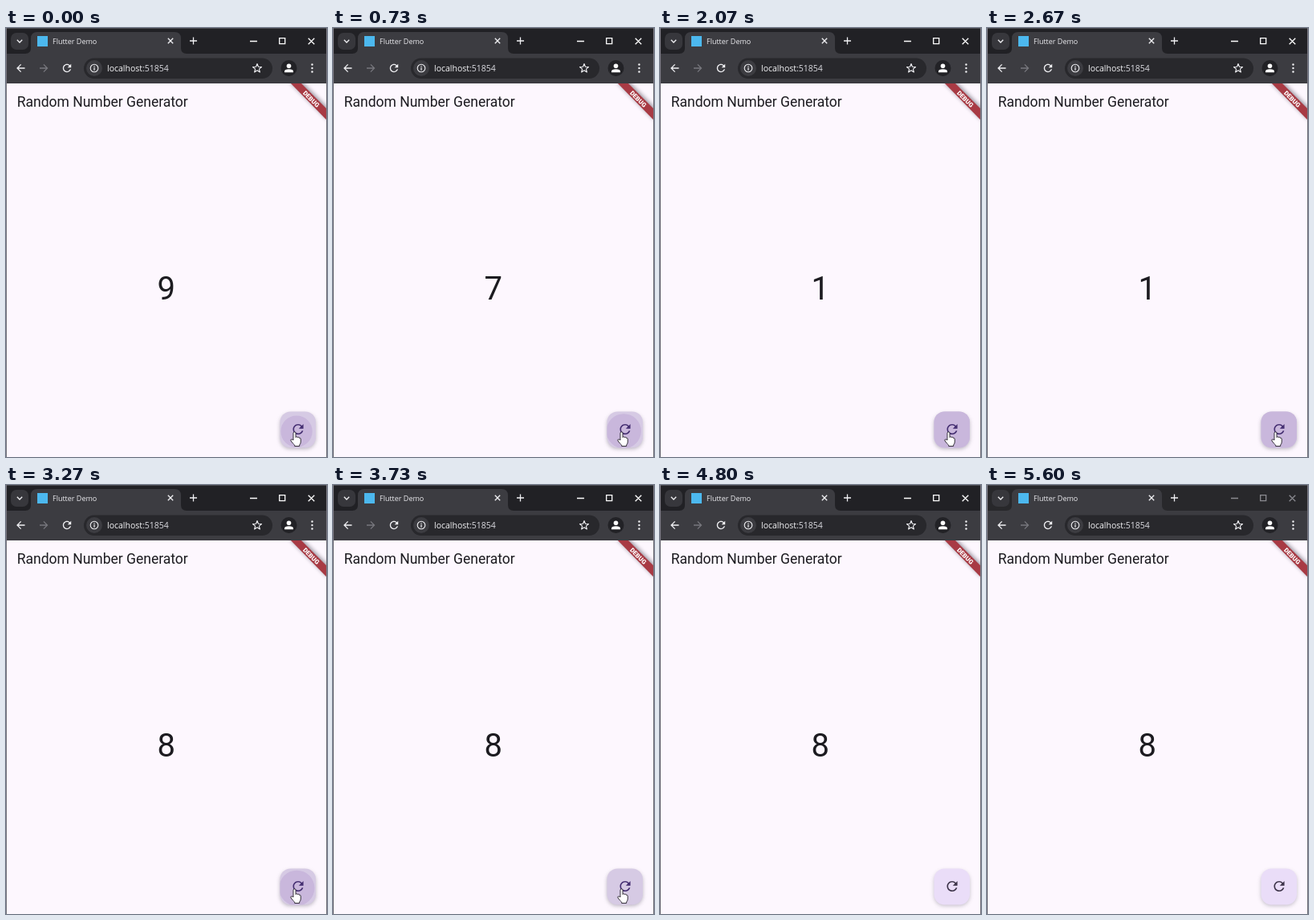
These frames come from a looping animation (400x534 px, 5670 ms). An HTML page:

```html
<!DOCTYPE html>
<html lang="en">
<head>
<meta charset="utf-8">
<title>Random Number Generator</title>
<style>
  html, body { margin: 0; width: 100%; height: 100%; overflow: hidden; background: #fdf7fe; }
  svg { display: block; width: 400px; height: 534px; }
  .ui { font-family: "Open Sans", "Noto Sans", sans-serif; }
  .app { font-family: Roboto, Arial, sans-serif; fill: #1c1b20; }
  .line { fill: none; stroke: #f1f1f4; stroke-width: 1.3; }
</style>
</head>
<body>
<svg viewBox="0 0 400 534">
  <defs>
    <path id="refresh" d="M17.65 6.35C16.2 4.9 14.21 4 12 4c-4.42 0-7.99 3.58-7.99 8s3.57 8 7.99 8c3.73 0 6.84-2.55 7.73-6h-2.08c-.82 2.33-3.04 4-5.65 4-3.31 0-6-2.69-6-6s2.69-6 6-6c1.66 0 3.14.69 4.22 1.78L13 11h7V4z"/>
    <clipPath id="page"><rect x="1" y="69" width="398" height="465"/></clipPath>
    <clipPath id="fabClip"><rect x="341.5" y="477.5" width="44.5" height="45" rx="13"/></clipPath>
    <filter id="blur" x="-40%" y="-40%" width="180%" height="180%"><feGaussianBlur stdDeviation="2.6"/></filter>
  </defs>

  <!-- window frame, tab and toolbar -->
  <rect width="400" height="534" fill="#fdf7fe"/>
  <rect id="titlebar" width="400" height="33"/>
  <rect y="32" width="400" height="37" fill="#3c3c41"/>
  <path d="M24 32q7 0 7-7V13q0-8 8-8h171q8 0 8 8v12q0 7 7 7z" fill="#3c3c41"/>
  <rect x="6" y="6" width="22" height="21" rx="7" fill="#37373c"/>
  <path class="line" d="M13.8 14.8l3.2 3.2 3.2-3.2"/>
  <rect x="39" y="10" width="13" height="13" fill="#4cb8ee"/>
  <text class="ui" x="58" y="20" font-size="9" fill="#ececf0">Flutter Demo</text>
  <path class="line" d="M201.8 12.8l6.4 6.4m0-6.4l-6.4 6.4M229 16h9m-4.5-4.5v9"/>
  <path id="controls" class="line" d="M304 16.5h9M340.7 12.7h7v7h-7zM376.7 12.7l7.6 7.6m0-7.6l-7.6 7.6"/>

  <path class="line" d="M23.5 50h-9.5m4.6-4.6L14 50l4.6 4.6"/>
  <path class="line" d="M42 50h9.5m-4.6-4.6l4.6 4.6-4.6 4.6" style="stroke:#77777d"/>
  <use href="#refresh" transform="translate(68.2 42.2) scale(.65)" fill="#f1f1f4"/>
  <rect x="97" y="37.5" width="235" height="25.5" rx="12.7" fill="#28282c"/>
  <circle cx="110" cy="50" r="10" fill="#3c3c41"/>
  <circle class="line" cx="110" cy="50" r="4.8" style="stroke-width:1.1"/>
  <path class="line" d="M110 49.3v3.4m0-5.5v1.2" style="stroke-width:1.2"/>
  <text class="ui" x="126" y="54" font-size="10.5" fill="#f6f6f8">localhost<tspan fill="#dcdce2">:51854</tspan></text>
  <path class="line" id="star" style="stroke-width:1.1;stroke-linejoin:round"/>
  <circle cx="352.5" cy="50" r="10" fill="#222226"/>
  <circle cx="352.5" cy="47.2" r="2.8" fill="#fff"/>
  <path d="M347 55.2v-1.4q0-2.6 5.5-2.6t5.5 2.6v1.4z" fill="#fff"/>
  <g fill="#f1f1f4"><circle cx="381.5" cy="45.5" r="1.2"/><circle cx="381.5" cy="50" r="1.2"/><circle cx="381.5" cy="54.5" r="1.2"/></g>
  <path d="M0 .5h400" stroke="#4a4a50"/>
  <path d="M.5 0v534M399.5 0v534" stroke="#77757e"/>

  <!-- page -->
  <text class="app" x="13.7" y="97.8" font-size="17.5">Random Number Generator</text>
  <text class="app" id="number" x="199.8" y="338.3" font-size="40" text-anchor="middle">9</text>
  <g clip-path="url(#page)">
    <path d="M353 67l48 48v-16l-32-32z" fill="#55505c" opacity=".55" filter="url(#blur)"/>
    <path d="M353 67l48 49v-14l-35-35z" fill="#a83a44"/>
    <text transform="translate(380.3 88.4) rotate(45)" y="2.8" font-family="Roboto, Arial, sans-serif" font-weight="900" font-size="7.9" text-anchor="middle" fill="#fff">DEBUG</text>
  </g>

  <rect id="shadow" x="341.5" y="480" width="44.5" height="44" rx="13" fill="#827c8c" filter="url(#blur)"/>
  <rect id="fab" x="341.5" y="477.5" width="44.5" height="45" rx="13"/>
  <g clip-path="url(#fabClip)"><circle id="ripple" fill="#c9b7dc"/></g>
  <use id="icon" href="#refresh" transform="translate(354.2 489.7) scale(.82)"/>
  <path id="hand" d="M359.6 513v-8.5q0-1.7 1.5-1.7t1.5 1.7v5q.3-.8 1.3-.7 1 .1 1.1 1 .4-.6 1.3-.4 1 .2 1 1.1 1.6-.3 1.6 1.2v3.3q0 2.4-1.6 4v1.5h-6v-1.3q-2.4-2-4.6-5.2-.7-1.2.2-1.8 1-.6 2.7.8z" fill="#fff" stroke="#221f26" stroke-width=".9" stroke-linejoin="round"/>
</svg>
<script>
  const LOOP = 5670, STEP = 1000 / 15;
  const LEAVE = 4500, BLUR = 5530;       // pointer slides off, window loses focus
  const PRESS = 90, SPREAD = 225, FADE = 150;
  // release time in ms, number shown from then on
  const TAPS = [[-50, 9], [670, 7], [1240, 2], [1860, 1], [2520, 1], [3200, 8], [3985, 8]];

  const el = id => document.getElementById(id);
  const clamp = v => Math.max(0, Math.min(1, v));
  const mix = (a, b, p) => a + (b - a) * p;
  const [titlebar, number, controls, shadow, fab, ripple, icon, hand] =
    ["titlebar", "number", "controls", "shadow", "fab", "ripple", "icon", "hand"].map(el);

  const corners = Array.from({ length: 10 }, (_, i) => {
    const r = i % 2 ? 2.5 : 5.8, a = i * Math.PI / 5;
    return `${313 + r * Math.sin(a)} ${50.3 - r * Math.cos(a)}`;
  });
  el("star").setAttribute("d", `M${corners.join("L")}Z`);

  function drawRipple(t) {
    const [release] = TAPS.filter(([at]) => at - PRESS <= t).pop();
    const age = t - release;
    const p = 1 - (1 - clamp(age / SPREAD)) ** 2;
    ripple.setAttribute("cx", mix(361, 363.7, p));
    ripple.setAttribute("cy", mix(503.5, 500, p));
    ripple.setAttribute("r", mix(11, 33, p));
    ripple.style.opacity = clamp((age + PRESS) / 75) * clamp((SPREAD + FADE - age) / FADE);
  }

  function draw(t) {
    const hover = t < LEAVE, focus = t < BLUR;
    const slide = clamp((t - LEAVE + 70) / 200);
    number.textContent = TAPS.filter(([at]) => at <= t).pop()[1];
    titlebar.style.fill = focus ? "#212125" : "#28282b";
    controls.style.stroke = focus ? "#fff" : "#8a8a90";
    fab.style.fill = hover ? "#d6cae4" : "#eaddf8";
    shadow.style.opacity = hover ? .55 : .45;
    icon.style.fill = hover ? "#432d70" : "#3c3348";
    hand.setAttribute("transform", `translate(${mix(-1.6, 14, slide)} ${mix(0, 36, slide)})`);
    drawRipple(t);
  }

  const start = performance.now();
  function tick() {
    const t = (performance.now() - start) % LOOP;
    draw(Math.floor((t + 4) / STEP) * STEP);
    requestAnimationFrame(tick);
  }
  tick();
</script>
</body>
</html>
```
